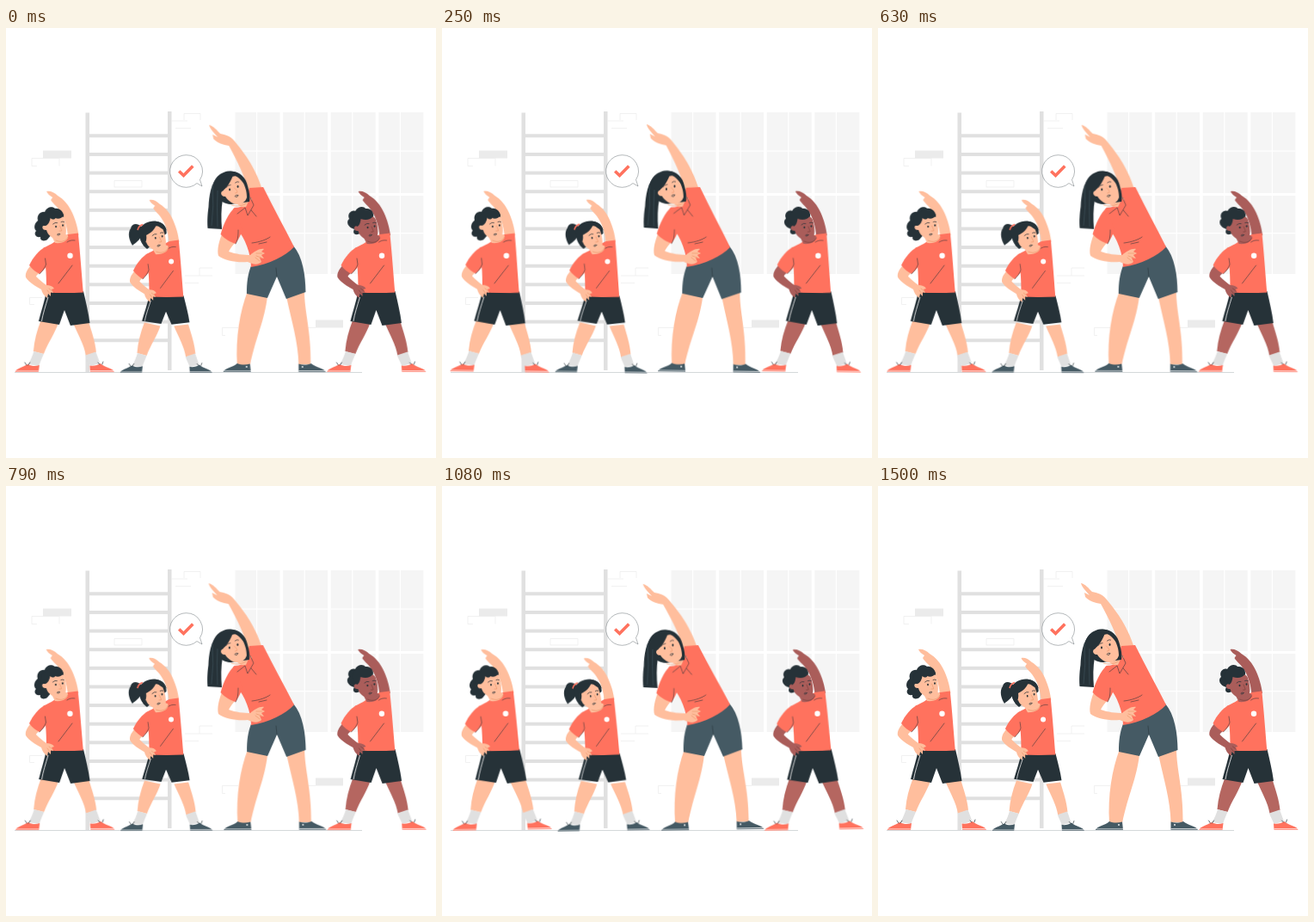
Animation of 500x500 px, one loop 1540 ms. Source, as an HTML page:

```html
<!DOCTYPE html>
<html lang="en">
<head>
<meta charset="utf-8">
<title>Stretching class</title>
<style>
html, body { margin: 0; width: 100%; height: 100%; overflow: hidden; background: #fff; }
svg { display: block; width: 100vw; height: 100vh; }
.sway { transform-box: fill-box; transform-origin: center; }
.skin { fill: var(--skin, #ffbe9d); }
.leg { fill: var(--leg, #ffbe9d); }
.top { fill: #ff725e; }
.dark { fill: #263238; }
.slate { fill: #455a64; }
.sock { fill: #e0e0e0; }
.shoe { fill: var(--shoe, #ff725e); }
.shorts { transform: scaleY(var(--hem, 1)); transform-origin: 0 307px; }
.line { fill: none; stroke: #263238; stroke-width: .7; stroke-linecap: round; stroke-linejoin: round; }
.fold { fill: none; stroke: #263238; stroke-width: .55; stroke-linecap: round; }
.crease { fill: none; stroke: var(--crease, #eb996e); stroke-width: .7; stroke-linecap: round; }
.sole { fill: none; stroke: #fff; stroke-width: .7; }
.brick { fill: none; stroke: #ebebeb; stroke-width: .7; }
</style>
</head>
<body>
<svg viewBox="0 0 500 500">
  <defs>
    <g id="kid">
      <path class="skin" d="M47 190C51 189 56 191 60 195C67 199 73 206 77 215C81 224 83 231 84.500 241L72 243C71 229 67 219 62 212C59 207 54 204 52 200L54 197C51 195 48 193 47 190Z"/>
      <path class="leg" d="M41 339L61 343C57 355 49 366 44 379L32 376C33 363 36 352 41 339ZM78 343L96 341C100 354 104 365 105 377L93 381C91 368 84 357 78 343Z"/>
      <path class="sock" d="M32.500 376L44 379C42 384 40 388 38.500 393L26 391C29 386 31 381 32.500 376ZM92.500 380.500L104.500 376.500C106.500 381 108 386 109.500 390L98 393C96 388 94 385 92.500 380.500Z"/>
      <path class="shoe" d="M11 399.700C12 396 19 395 25.500 391C30 393.500 35 393.500 39 392L38 400H11ZM97.500 392.500C102 393.500 107 392 110 390C114 394.500 125 395.500 126 399.700H98Z"/>
      <path class="sole" d="M11.500 398.900H38M98 398.600H126"/>
      <path class="line" d="M24 392l-2-3M26 392l2-3M109 391l-2-2M112 391l1-3"/>
      <g class="shorts">
        <path class="dark" d="M47 306L90 306C93 319 96 331 97.500 343L75 346L68 328L62 345L38 341C41 329 45 317 47 306Z"/>
        <path fill="none" stroke="#fff" stroke-width=".8" d="M49 313C46 323 43 332 41.500 341"/>
      </g>
      <path class="top" d="M43 256C50 253 56 249 59 247L72 240L83.800 238.500C86 260 88 286 89.800 307.500Q69 308.500 47 307.500C47 292 47 276 43 256Z"/>
      <path class="skin" d="M28 277L40 284C37 286 35 288 35 289C39 293 44 297 47 299C51 299 54 300 56 303L53 304L55 308L52 307L52 312L49 309L48 314C44 311 42 308 41 304C34 300 27 296 23 290C22 285 25 281 28 277Z"/>
      <path class="crease" d="M50 303L54 306M48 305L51 309"/>
      <path class="top" d="M45 255C39 258 31 267 27 276C31 281 35 284 39 286C43 282 46 279 48 276Z"/>
      <path class="fold" d="M39 286C43 282 45 279 46.500 275L45.500 268M71 249C75 246 79 247 80 247M77 276L61 297"/>
      <circle cx="74.500" cy="264.700" r="3.200" fill="#fff"/>
    </g>
    <g id="face">
      <path class="skin" d="M51 238L67 239L72 241C73 247 66 251 57 250Z"/>
      <path class="crease" d="M58 247C64 250 70 248 72 243"/>
      <path class="skin" d="M47 222C54 215 65 216 67.500 222C69.500 228 70.500 235 69.500 240C68 246 63 248 57 245C51 243 48 239 47 235C42 236 40 229 46 229Z"/>
      <g class="dark">
        <ellipse cx="58" cy="231" rx=".9" ry="1.300"/>
        <ellipse cx="66" cy="229.500" rx=".9" ry="1.300"/>
      </g>
      <path class="line" d="M54.500 228Q57 225.500 59.500 226.500M64 225.500Q65.500 224.500 67.500 225.500"/>
      <path class="crease" d="M62.500 230C63.500 233 65 235 64.500 236L62 236"/>
      <path class="line" d="M59.500 240Q61 238.500 63 239.500Q62 241.500 60 241"/>
    </g>
  </defs>

  <g id="room">
    <g id="windows"></g>
    <g fill="#e0e0e0" id="ladder">
      <rect x="92.500" y="98.500" width="4.500" height="301.500"/>
      <rect x="188" y="97" width="4.500" height="301"/>
    </g>
    <path fill="#ebebeb" d="M43 142.500H76V151.500H43ZM360 339.500H392V348.500H360Z"/>
    <path class="brick" d="M36 160.500H30V151.500H62V160.500M192 108H211M197 116.500H215M207 107V99.500H226V107M126 177.500H158V185H126ZM225 288V279H240M208 288H240M208 296.500H224M42 313.500H27.500V321.500H33M270 348.500H251.500V357.500H255M350 348.500H360"/>
    <path stroke="#b8bec1" stroke-width=".6" d="M10 400.500H414"/>
    <path d="M209.500 147.700A18.800 18.800 0 1 0 222 180.500L228 184L225.500 176.500A18.800 18.800 0 0 0 209.500 147.700Z" fill="#fff" stroke="#263238" stroke-width=".35"/>
    <path d="M201.200 166.500L206.500 171.500L217.300 160.500" fill="none" stroke="#ff725e" stroke-width="3.600"/>
  </g>

  <g class="sway">
    <use href="#kid"/>
    <path class="dark" d="M48 246C44 249 39 247 40 243C34 244 32 239 35 236C31 232 34 226 37 224C35 217 41 213 45 214C47 208 54 207 57 210C62 209 67 214 67 219L58 234Z"/>
    <use href="#face"/>
    <path class="dark" d="M46 230C49 229 51 225 51.500 221C54 223 56 223 57.500 221C60 222.500 65 221.500 67 218C65 211 57 210 52 212L42 219L40 230Z"/>
  </g>

  <g class="sway" style="--shoe:#455a64;--hem:.88">
    <use href="#kid" transform="matrix(.93 0 0 .957 122.800 18.200)"/>
    <path class="dark" d="M157 231C152 226 146 228 145 233C141 238 143 247 147 253C150 250 156 247 158 240Z"/>
    <path class="dark" d="M155 234C159 226 171 222 179 226C185 229 187 234 186.500 239L164 257C158 253 154 244 155 234Z"/>
    <use href="#face" transform="rotate(-4 177 241) translate(115.500 13)"/>
    <path class="dark" d="M156 237C158 229 165 225 172 225C181 225 185 229 186.500 235C181 234 177 231 175 228C173 234 169 238 163 241C164 246 162 250 161 254C157 250 154 243 156 237Z"/>
    <path d="M153 235Q154 230 159 228.500" fill="none" stroke="#ff725e" stroke-width="1.600"/>
  </g>

  <g class="sway">
    <path class="skin" d="M236 113C241 114 245 119 249 123C255 124 261 126 265 131C275 143 289 160 298 188L283 192C277 172 269 155 259 137C252 136 246 134 241 129L240 124L246 127C242 122 237 118 236 113Z"/>
    <path class="skin" d="M281 306L304 312C301 340 291 358 284 392H269C267 360 272 330 281 306ZM326 312L347 305C347 330 355 352 354.500 391H340.500C340 365 332 340 326 312Z"/>
    <path class="slate" d="M253 399.700C255 395 264 395 269 390C274 392 279 392 284 390.500L285 400H253ZM340.500 390.500C345 392 350 392 355 390C360 394.500 370 395.500 372 399.700H340.500Z"/>
    <path class="sole" d="M254 398.800H285M340.500 398.500H371"/>
    <g fill="#fff"><circle cx="280" cy="394" r=".9"/><circle cx="345" cy="394" r=".9"/></g>
    <path class="slate" d="M286 274L334 253C345 266 348.300 287 348.500 307L326 315L315 289L304 314L280 309C280 296 281 286 286 274Z"/>
    <path class="fold" d="M315 289L314 279"/>
    <path class="top" d="M264 210C271 210 275 207 278 202L283 186L299 185C311 209 323 231 335 254.500C325 265 306 275 285 278C285 263 278 244 268 233Z"/>
    <path class="skin" d="M251 240L268 248C264 252 261 256 259 260C267 263 277 264 284 264C289 260 295 256 300 257L297 260L301 262L297 264L300 268L295 267L297 272C292 277 286 274 281 272C269 273 255 271 247 265C245 258 248 247 251 240Z"/>
    <path class="crease" d="M291 262L298 262M291 265L297 267M290 267L295 271"/>
    <path class="top" d="M266 209C258 216 253 228 249.500 240C255 246 261 249 267 251C270 246 273 241 275 235Z"/>
    <path class="fold" d="M267 251C270 246 270 240 270 235M286 250C295 249 303 246 307 243M294 251L303 249M281 207L291 219"/>
    <path class="skin" d="M266 203L278 192L286 199C286 205 281 209 275 209Z"/>
    <path class="top" d="M265 209L279 208L284 197L288 206L281 218L277 211L269 216Z"/>
    <path class="fold" d="M269 216L278 209L281 218L288 206L284 197"/>
    <path class="dark" d="M247 172C238 180 236 196 235.500 208C234 218 234 227 234.500 233L251 234C250 222 250 210 252 199L257 186Z"/>
    <path class="dark" d="M241 185C241 174 251 166 261 166.500C272 167 279 174 281 184C283 191 284 197 283 202L262 205C253 205 241 198 241 185Z"/>
    <path class="skin" d="M252 182C257 173 268 169 273 175C278 183 280 190 280 197C278 205 268 207 262 203C258 200 256 198 255 196C250 197 248 190 253 189Z"/>
    <path class="dark" d="M249 191C254 189 260 182 264 171C268 172 274 176 279 185C279 173 268 165 259 167C249 168 242 177 244 187Z"/>
    <path d="M240 183Q242 207 239 230M246 189Q245 207 246 231" fill="none" stroke="#455a64" stroke-width=".5"/>
    <g class="dark">
      <ellipse cx="260" cy="188" rx="1" ry="1.400"/>
      <ellipse cx="269.500" cy="184.500" rx="1" ry="1.400"/>
    </g>
    <path class="line" d="M256 185.500Q257.500 182.500 261 182.500M266.500 180Q268.500 178 270.500 179"/>
    <path class="crease" d="M265.500 186C267.500 188 269.500 190 268.500 191.500L266.500 192M262 206C268 208 275 207 279 204"/>
    <path class="line" d="M266 195.500Q268 193.500 270 194.500Q269.500 197 267 196.500"/>
  </g>

  <g class="sway" style="--skin:#aa5d5a;--leg:#b56660;--crease:#7d3f3b">
    <use href="#kid" x="362.500"/>
    <path class="dark" d="M409 240C404 241 403 237 405 234C397 232 395 225 399 222C396 216 402 211 406 213C409 207 416 207 418 210C425 209 428 215 427 220L420 235Z"/>
    <use href="#face" x="362.500" y="1"/>
    <path class="dark" d="M408 231C411 230 412 226 412.500 222C418 224 424 223 426.500 219C427 212 420 209 415 211C408 210 402 216 403 223Z"/>
  </g>
</svg>
<script>
const NS = 'http://www.w3.org/2000/svg';
const PERIOD = 1540;
const LEAD = 40;

function rect(parent, x, y, width, height, fill) {
  const el = document.createElementNS(NS, 'rect');
  const attrs = { x, y, width, height };
  if (fill) attrs.fill = fill;
  for (const key in attrs) el.setAttribute(key, attrs[key]);
  parent.append(el);
}

const ladder = document.getElementById('ladder');
for (let i = 0; i < 12; i++) rect(ladder, 96, 123.3 + i * 21.63, 93, 4);

const panes = document.getElementById('windows');
for (let i = 0; i < 4; i++) {
  const x = 266.5 + i * 55.6;
  for (const [y, h] of [[98, 94], [195, 91]]) {
    rect(panes, x, y, 52, h, '#f5f5f5');
    rect(panes, x + 24.5, y, 1.2, h, '#fff');
    rect(panes, x, y + h / 2 - 2.5, 52, 1.2, '#fff');
  }
}

// Linear swing: one degree right, one degree left, back to upright.
const swing = [[0, 0], [.25, 1], [.75, -1], [1, 0]].map(
  ([offset, deg]) => ({ offset, transform: `rotate(${deg}deg)` }));
for (const el of document.querySelectorAll('.sway')) {
  el.animate(swing, { duration: PERIOD, iterations: Infinity, delay: -LEAD });
}
</script>
</body>
</html>
```
